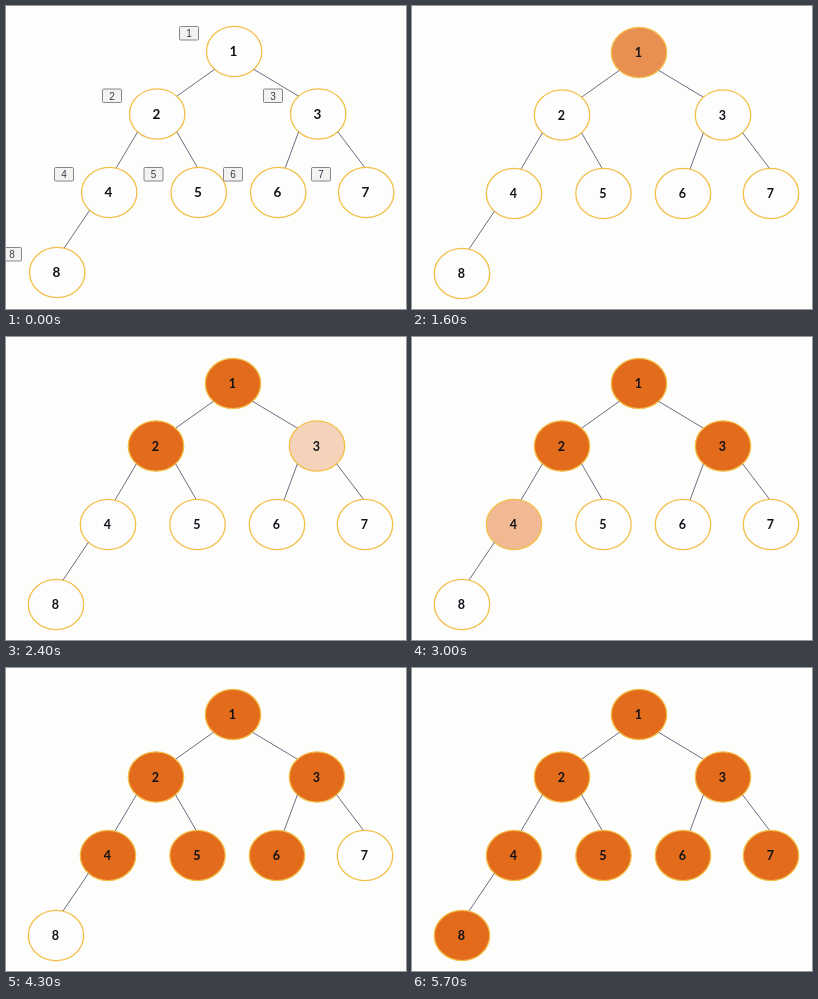
Animation of 400 by 303 pixels, one loop 5800 ms. Source, as an HTML page:

```html
<!DOCTYPE html>
<html lang="en">
<head>
<meta charset="utf-8">
<title>Breadth-first traversal</title>
<style>
  html, body { margin: 0; width: 100%; height: 100%; overflow: hidden; background: #fdfdfc; }
  svg { display: block; width: 400px; height: 303px; }
  text { text-anchor: middle; }
  .edge { stroke: #6c6c84; }
  .node { fill: #fdfdfe; stroke: #f3bf48; stroke-width: 1.3; }
  .num { font: 700 12.5px Lato, "Open Sans", sans-serif; fill: #111118; }
  .tag rect { fill: #f2f2f1; stroke: #86868c; }
  .tag text { font: 10px "Liberation Sans", Arial, sans-serif; fill: #3c3c4c; }

  /* the first second shows the labelled slide, then a hard cut */
  #tree { animation: slide 5.8s step-end infinite; }
  #tags { animation: tags 5.8s step-end infinite; }
  .num { animation: num 5.8s step-end infinite; }
  @keyframes slide { 0% { transform: translate(1.2px, -1px); } 17.2%, 100% { transform: none; } }
  @keyframes tags { 0% { visibility: visible; } 17.2%, 100% { visibility: hidden; } }
  @keyframes num { 0% { font-size: 13.5px; } 17.2%, 100% { font-size: 12.5px; } }
</style>
</head>
<body>
<svg viewBox="0 0 400 303">
  <g id="tree"></g>
  <g id="tags"></g>
</svg>
<script>
  const LOOP = 5800, TICK = 100;
  const FIRST = 1220, GAP = 515, FADE = 500;
  const WHITE = [253, 253, 254], ORANGE = [226, 108, 28];
  const RX = 27.7, RY = 25.2;

  // node n is the child of floor(n / 2); its depth sets the row
  const columns = [227, 150, 311, 102, 191.5, 271, 359, 50];
  const rows = [46.5, 109, 187.5, 267.5];
  const nodes = columns.map((x, i) => {
    const n = i + 1, depth = Math.floor(Math.log2(n));
    return { n, x, y: rows[depth], depth, side: n % 2 ? 1 : -1 };
  });

  // edges leave a parent diagonally and reach deeper children near the top
  function drawEdge({ n, x, y, depth, side }) {
    const parent = nodes[Math.floor(n / 2) - 1];
    const diagX = RX * Math.SQRT1_2, diagY = RY * Math.SQRT1_2;
    const [dx, dy] = depth === 1 ? [-side * diagX, diagY] : [3 - 4 * side, RY - 0.7];
    return `<line class="edge" x1="${parent.x + side * diagX}" y1="${parent.y + diagY}"
      x2="${x + dx}" y2="${y - dy}"/>`;
  }

  const drawNode = ({ n, x, y }) =>
    `<ellipse class="node" id="node${n}" cx="${x}" cy="${y}" rx="${RX}" ry="${RY}"/>
     <text class="num" x="${x - 0.7}" y="${y + 4.6}">${n}</text>`;

  const drawTag = ({ n, x, y }) =>
    `<g class="tag" transform="translate(${x - 54} ${y - 26.5})">
       <rect x="0.5" y="0.5" width="19" height="13.5" rx="1"/>
       <text x="10" y="11">${n}</text>
     </g>`;

  const mix = k => `rgb(${WHITE.map((w, i) => Math.round(w + (ORANGE[i] - w) * k))})`;
  const pct = ms => (ms / LOOP * 100).toFixed(4) + '%';

  // each node fades linearly, sampled once per tick
  function fillRule({ n }) {
    const start = FIRST + (n - 1) * GAP;
    let frames = `0% { fill: ${mix(0)}; }`;
    for (let t = Math.ceil(start / TICK) * TICK; t < start + FADE + TICK; t += TICK) {
      frames += `${pct(t - 5)} { fill: ${mix(Math.min(1, (t - start) / FADE))}; }`;
    }
    return `@keyframes fill${n} { ${frames} 100% { fill: ${mix(1)}; } }
      #node${n} { animation: fill${n} ${LOOP}ms step-end infinite; }`;
  }

  const render = (id, items, draw) => {
    document.getElementById(id).innerHTML = items.map(draw).join('');
  };

  const style = document.createElement('style');
  style.textContent = nodes.map(fillRule).join('\n');
  document.head.append(style);
  render('tree', nodes, node => (node.depth ? drawEdge(node) : '') + drawNode(node));
  render('tags', nodes, drawTag);
</script>
</body>
</html>
```
